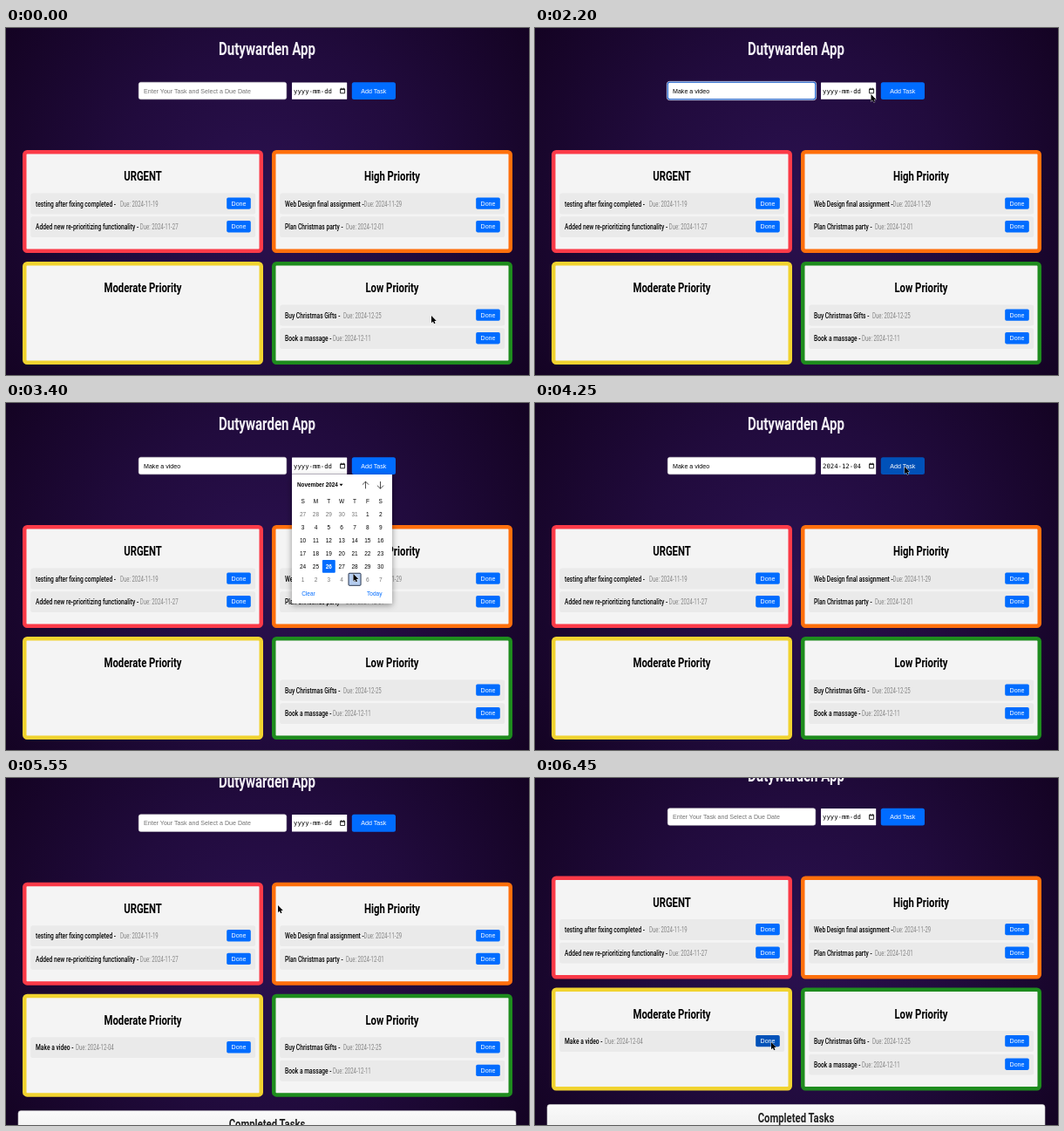
Recreate the animation shown at these times as an HTML page. Size 600 by 398 pixels, loop 6.5 s.

```html
<!DOCTYPE html>
<html lang="en">
<head>
<meta charset="utf-8">
<title>Dutywarden App</title>
<style>
  html, body { margin: 0; width: 100%; height: 100%; overflow: hidden; background: #180629; }
  svg { display: block; width: 600px; height: 398px; }
  text { font-family: "Liberation Sans", Arial, sans-serif; font-size: 7.1px; white-space: pre; }
  .mid { text-anchor: middle; }
  .head, .task, .due { font-family: Roboto, "Open Sans", sans-serif; }
  .head { font-size: 14.8px; font-weight: 700; text-anchor: middle; }
  .title { font-size: 19.7px; fill: #f3f0f6; }
  .task { font-size: 9.7px; font-weight: 500; }
  .due { font-size: 8.6px; fill: #858585; }
  .mono { font-family: "DejaVu Sans Mono", "Liberation Mono", monospace; font-size: 7.3px; }
  .cal text { font-size: 6.5px; text-anchor: middle; }
  .cal .left { text-anchor: start; }
  .btn { fill: #006cff; }
  .hot { fill: #0051b8; }
  .white { fill: #fff; }
</style>
</head>
<body>
<svg id="stage" viewBox="0 0 600 398"></svg>
<script>
const LOOP = 6500, STEP = 50;
const stage = document.getElementById('stage');

const rect = (x, y, w, h, r, attrs) =>
  `<rect x="${x}" y="${y}" width="${w}" height="${h}" rx="${r}" ${attrs}/>`;
const text = (x, y, str, attrs = '') => `<text x="${x}" y="${y}" ${attrs}>${str}</text>`;
// Condensed lettering: one ratio per weight
const narrow = (x, y, str, cls, ratio) =>
  text(0, 0, str, `class="${cls}" transform="translate(${x} ${y}) scale(${ratio} 1)"`);
const heading = (x, y, str, cls = '') => narrow(x, y, str, 'head ' + cls, 0.765);

function taskRow(x, y, [name, due, dueX], id = '') {
  return `<g id="${id}">` + rect(x, y, 258, 23.8, 2.5, 'fill="#eaeaea"') +
    narrow(x + 5.8, y + 14.9, name + ' -', 'task', 0.69) +
    narrow(dueX, y + 14.9, 'Due: ' + due, 'due', 0.7) +
    rect(x + 225, y + 4.8, 27.6, 13.4, 1.8, 'class="btn"') +
    text(x + 238.8, y + 14.1, 'Done', 'class="mid white"') + '</g>';
}

function card(x, y, color, name, tasks, id) {
  return rect(x + 2.25, y + 2.25, 271.5, 113.5, 3, `fill="#f4f4f4" stroke="${color}" stroke-width="4.5"`) +
    heading(x + 138, y + 35.2, name) +
    tasks.map((task, i) => taskRow(x + 9.2, y + 49.6 + i * 26.6, task, id)).join('');
}

const CAL = { x: 333.2, y: 120.6, step: 14.85 };

function calendar() {
  const { x, y, step } = CAL;
  const at = (col, row) => [x + (col + 0.5) * step, y + (row + 0.5) * step + 2.3];
  let out = rect(328, 82, 115, 148, 0, 'fill="#fff" filter="url(#shadow)"') +
    text(334, 96, 'November 2024', 'class="left" font-weight="700" style="font-size:6.35px"') +
    '<path d="M382.5 92.8h4l-2 2.4z"/>' +
    '<path d="M412.5 98.3v-8.2m-3.6 3.6 3.6-3.6 3.6 3.6M429.5 90v8.2m-3.6-3.6 3.6 3.6 3.6-3.6" fill="none" stroke="#222" stroke-width=".8"/>' +
    rect(x + 2 * step, y + 4 * step, step, step, 1, 'class="btn"') +
    rect(0, 0, step - 0.8, step - 0.8, 1, 'id="hover" fill="#b5cdf0" stroke="#15233c" stroke-width=".9"');
  [...'SMTWTFS'].forEach((d, col) => { out += text(...at(col, -1), d); });
  for (let i = 0; i < 42; i++) {
    const day = i - 4;
    const label = day < 1 ? day + 31 : day > 30 ? day - 30 : day;
    const look = day === 26 ? 'fill="#fff" font-weight="700"'
      : day < 1 || day > 30 ? 'fill="#767676"' : '';
    out += text(...at(i % 7, Math.floor(i / 7)), label, look);
  }
  out += text(347, 220.6, 'Clear', 'class="btn"') + text(422.8, 220.6, 'Today', 'class="btn"');
  return `<g id="calendar" class="cal">${out}</g>`;
}

stage.innerHTML = `
  <defs>
    <radialGradient id="night" gradientUnits="userSpaceOnUse" cx="300" cy="200" r="360">
      <stop offset="0" stop-color="#2b1150"/><stop offset=".5" stop-color="#210b3d"/>
      <stop offset="1" stop-color="#140323"/>
    </radialGradient>
    <linearGradient id="panel" x2="0" y2="1">
      <stop offset="0" stop-color="#fafafa"/><stop offset=".3" stop-color="#f0f0f0"/>
    </linearGradient>
    <filter id="shadow" x="-20%" y="-20%" width="140%" height="140%">
      <feDropShadow dx="0" dy="2" stdDeviation="3.5" flood-opacity=".4"/>
    </filter>
  </defs>
  ${rect(0, 0, 600, 398, 0, 'fill="url(#night)"')}
  <g id="page">
    ${heading(299.5, 31, 'Dutywarden App', 'title')}
    ${rect(152.2, 62.2, 169.6, 19.6, 2.5, 'fill="#fff" stroke="#ccc" stroke-width=".5"')}
    <g id="ring" fill="none">
      ${rect(151.4, 61.4, 171.2, 21.2, 3, 'stroke="#e8eefb" stroke-width=".9"')}
      ${rect(152.3, 62.3, 169.4, 19.4, 2.4, 'stroke="#1660d2" stroke-width="1.1"')}
    </g>
    ${text(158, 74.6, '', 'id="entry"')}
    <path id="caret" d="M0 68v8.2" stroke="#111" stroke-width=".6"/>
    ${rect(328, 62.4, 63.2, 19.4, 0.5, 'fill="#fff"')}
    ${text(330, 74.6, '', 'id="date" class="mono"')}
    <path d="M383.6 69.8h5v5h-5zM383.6 70.5h5" fill="none" stroke="#111" stroke-width=".9"/>
    <path d="M384.7 68.6v1m2.8-1v1" stroke="#111" stroke-width=".7"/>
    ${rect(396.8, 62.2, 50.2, 19.8, 2.5, 'id="add" class="btn"')}
    ${text(421.8, 74.6, 'Add Task', 'class="mid white"')}
    ${card(19, 140, '#fb3a48', 'URGENT', [
      ['testing after fixing completed', '2024-11-19', 131],
      ['Added new re-prioritizing functionality', '2024-11-27', 153.8]])}
    ${card(305, 140, '#ff6f0c', 'High Priority', [
      ['Web Design final assignment', '2024-11-29', 410.5],
      ['Plan Christmas party', '2024-12-01', 390]])}
    ${card(19, 268, '#f1d330', 'Moderate Priority', [['Make a video', '2024-12-04', 80]], 'newTask')}
    ${card(305, 268, '#1e8c1e', 'Low Priority', [
      ['Buy Christmas Gifts', '2024-12-25', 387],
      ['Book a massage', '2024-12-11', 375]])}
    ${rect(14, 402, 571, 90, 3, 'fill="url(#panel)" stroke="#c9c9c9" stroke-width=".6"')}
    ${heading(299.5, 422.6, 'Completed Tasks', '" fill="#222')}
    ${calendar()}
  </g>
  <path id="cursor" d="M0 0V8.2L1.9 6.5 3.1 9.2 4.5 8.6 3.3 6H5.8Z" stroke="#fff" stroke-width=".7" paint-order="stroke"/>`;

const el = id => document.getElementById(id);
const show = (id, on) => el(id).setAttribute('visibility', on ? 'visible' : 'hidden');

// [ms, x, y]
const PATH = [
  [0, 488, 330], [50, 488, 330], [650, 236, 72], [1900, 236, 72], [2200, 385.5, 76],
  [2750, 385.5, 76], [3350, 398.5, 196], [3450, 398.5, 196], [3600, 385, 202],
  [3750, 385, 202], [4200, 424, 73], [4500, 424, 73], [4850, 380, 105],
  [5000, 380, 105], [5350, 312, 146], [5650, 312, 146], [6350, 271, 303], [6500, 271, 303]
];
const SCROLL = [[0, 0], [5450, 0], [5600, 27.5], [6500, 27.5]];

function track(keys, t) {
  const i = keys.findIndex(k => k[0] > t);
  const [a, b] = [keys[i - 1], keys[i]];
  const u = (t - a[0]) / (b[0] - a[0]);
  const ease = u * u * (3 - 2 * u);
  return a.slice(1).map((v, n) => v + (b[n + 1] - v) * ease);
}

const TASK = 'Make a video';
const between = (t, a, b) => t >= a && t < b;

function draw(t) {
  const [x, y] = track(PATH, t);
  const [scroll] = track(SCROLL, t);
  el('page').setAttribute('transform', `translate(0 ${-scroll})`);
  el('cursor').setAttribute('transform', `translate(${x} ${y})`);
  show('cursor', !between(t, 850, 1950));

  const added = t >= 4450;
  const count = added ? 0 : Math.max(0, Math.min(TASK.length, Math.floor((t - 800) / 100)));
  const entry = el('entry');
  entry.textContent = count ? TASK.slice(0, count) : 'Enter Your Task and Select a Due Date';
  entry.setAttribute('fill', count ? '#000' : '#737373');
  show('ring', between(t, 750, 2400));
  show('caret', between(t, 750, 2150));
  const typed = count ? entry.getSubStringLength(0, count) : 0;
  el('caret').setAttribute('transform', `translate(${158.4 + typed} 0)`);

  el('date').textContent = between(t, 3700, 4450) ? '2024-12-04' : 'yyyy-mm-dd';
  const open = between(t, 2400, 3700);
  show('calendar', open);
  const col = Math.floor((x - CAL.x) / CAL.step), row = Math.floor((y - CAL.y) / CAL.step);
  show('hover', open && between(col, 0, 7) && between(row, 0, 6));
  el('hover').setAttribute('x', CAL.x + col * CAL.step + 0.4);
  el('hover').setAttribute('y', CAL.y + row * CAL.step + 0.4);

  show('newTask', added);
  el('add').classList.toggle('hot', between(x, 397, 447) && between(y, 62, 82));
  el('newTask').querySelector('.btn').classList.toggle('hot',
    between(x, 253, 281) && between(y + scroll, 322, 336));
}

const start = performance.now();
function tick() {
  const t = (performance.now() - start) % LOOP;
  draw(Math.floor(t / STEP) * STEP);
  requestAnimationFrame(tick);
}
tick();
</script>
</body>
</html>
```
